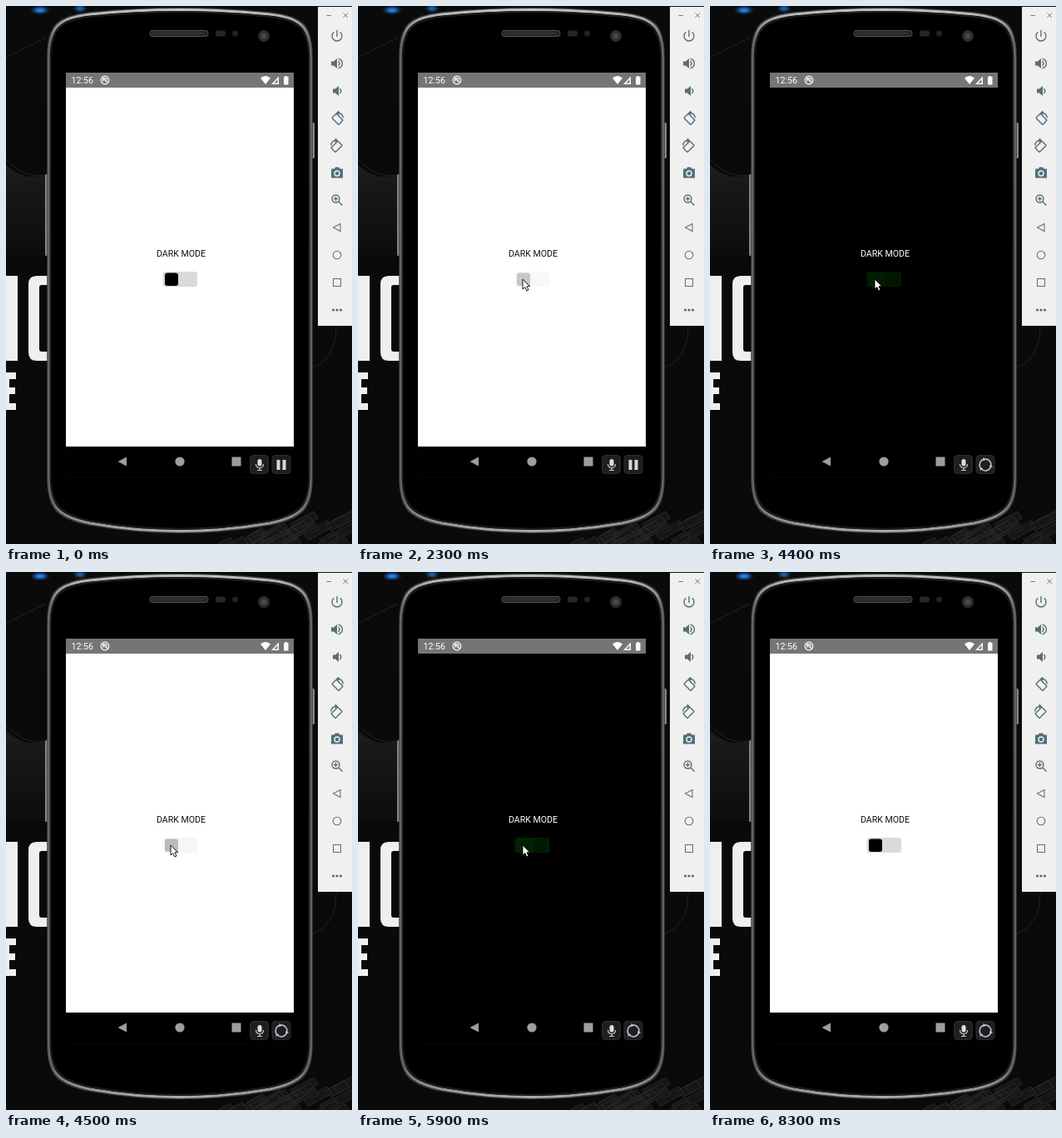
These frames come from a looping animation (416 by 646 pixels, 8600 ms). An HTML page:

```html
<!DOCTYPE html>
<html>
<head>
<meta charset="utf-8">
<style>
html, body { margin: 0; width: 100%; height: 100%; overflow: hidden; background: #0a0a0b }
svg { display: block; width: 416px; height: 646px }
text { font-family: Roboto, sans-serif }
.line { fill: none; stroke: #546e7a; stroke-width: 1.4 }
.thin { fill: none; stroke: #5f7680; stroke-width: 1.1 }
.solid { fill: #546e7a; stroke: none }
</style>
</head>
<body>
<svg viewBox="0 0 416 646">
  <defs>
    <linearGradient id="cloth" x2="0" y2="1">
      <stop stop-color="#1c1c1f"/><stop offset="1" stop-color="#0c0c0d"/>
    </linearGradient>
    <linearGradient id="rim" x2="0" y2="1">
      <stop stop-color="#c4c4c4"/><stop offset=".06" stop-color="#6a6a6a"/><stop offset=".5" stop-color="#666"/>
      <stop offset=".94" stop-color="#666"/><stop offset="1" stop-color="#aaa"/>
    </linearGradient>
    <radialGradient id="glow"><stop stop-color="#2f97f2"/><stop offset=".4" stop-color="#1b5fae"/><stop offset="1" stop-color="#0a2038" stop-opacity="0"/></radialGradient>
    <path id="body" d="M50 60C50 24 61 12 100 8Q209-3 318 8C357 12 368 24 368 60V568C368 603 357 615 318 623Q209 642 100 623C61 615 50 603 50 568Z"/>
  </defs>

  <!-- wallpaper -->
  <rect width="416" height="646" fill="#0a0a0b"/>
  <path d="M0 190Q24 214 52 200V300H0Z" fill="url(#cloth)"/>
  <path d="M0 184Q22 208 50 203M0 62L48 38M368 434Q397 424 397 384" fill="none" stroke="#232326"/>
  <ellipse cx="41" cy="5" rx="13" ry="6" fill="url(#glow)"/>
  <ellipse cx="89" cy="3" rx="10" ry="6" fill="url(#glow)" opacity=".7"/>
  <path id="blocks" fill="#161618" stroke="#29292c"/>
  <g fill="#efefef">
    <path d="M0 324H14V426H0ZM60 324H37Q27 324 27 334V416Q27 426 37 426H60V415H43Q40 415 40 412V338Q40 335 43 335H60Z"/>
    <path d="M0 440H12V448H4V458H11V466H4V477H12V485H0Z"/>
  </g>

  <!-- phone -->
  <g fill="#858585"><rect x="47" y="202" width="5" height="98" rx="1.5"/><rect x="366" y="140" width="5" height="43" rx="1.5"/></g>
  <use href="#body" stroke="#3c3c3c" stroke-width="1.5"/>
  <use href="#body" stroke="url(#rim)" stroke-width="3" transform="translate(2.1 2) scale(.99 .9937)"/>
  <use href="#body" fill="none" stroke="#1e1e1e" stroke-width="2" transform="translate(4.6 4.8) scale(.978 .985)"/>
  <rect x="173" y="29.5" width="70" height="7" rx="3" fill="#242424" stroke="#505050"/>
  <path d="M177 33H239" stroke="#3c3c3c" stroke-width="3" stroke-dasharray="1 1"/>
  <rect x="252" y="29.5" width="12" height="7" rx="3" fill="#262626"/>
  <circle cx="275.5" cy="33" r="3.5" fill="#222"/>
  <circle cx="310" cy="36" r="7" fill="#2d2d30"/><circle cx="310" cy="36" r="3.5" fill="#47474c"/>

  <!-- screen -->
  <path d="M72.5 98V566H345.5" fill="none" stroke="#080808"/>
  <rect id="page" x="72" y="98" width="274" height="431"/>
  <rect x="72" y="80" width="274" height="18" fill="#757575"/>
  <g fill="#fff">
    <text x="78.5" y="93.3" font-size="10.7">12:56</text>
    <path d="M306 86.500Q312 81.500 318 86.500L312 94ZM328 84.500V94H319ZM334 85H335.500V84H338V85H339.500V94.500H334Z"/>
    <path d="M326.500 88V92.500H322.500Z" fill="#757575"/>
    <g fill="none" stroke="#fff" stroke-width="1.2">
      <circle cx="119" cy="89" r="4.8"/><path d="M116 86L122 92M117 90.500A2.500 2.500 0 1 1 121.500 89.500"/>
    </g>
  </g>
  <text id="label" x="210.5" y="301" font-size="10.6" text-anchor="middle">DARK MODE</text>
  <rect id="track" x="188.5" y="319" width="41.5" height="18" rx="3"/>
  <rect id="thumb" y="320.5" width="16" height="15.5" rx="3"/>
  <g fill="#9e9e9e"><path d="M134.500 547L145 541.500V552.500ZM271.500 541.500H282.500V552.500H271.500Z"/><circle cx="209" cy="547" r="5.6"/></g>

  <!-- recorder buttons -->
  <g fill="#1e1f22" stroke="#2c2d31"><rect x="293.5" y="539.5" width="22" height="22" rx="4"/><rect x="320" y="539.5" width="22" height="22" rx="4"/></g>
  <rect x="302.5" y="544" width="5" height="8.5" rx="2.5" fill="#ddd"/>
  <path d="M300.500 550Q300.500 554.500 305 554.500T309.500 550M305 554V557.500M302 557.500H308" fill="none" stroke="#ccc" stroke-width="1.2"/>
  <path id="pause" d="M325.500 545H329.500V557H325.500ZM332.500 545H336.500V557H332.500Z" fill="#d8d8d8"/>
  <g id="sync" transform="translate(331 551)">
    <g id="arc"><path d="M-6 3.500A7 7 0 0 1-1.500-6.800" fill="none" stroke="#c4c4c4" stroke-width="1.5"/><path d="M-2.500-9L1-6.700L-2.500-4.500Z" fill="#c4c4c4"/></g>
    <use href="#arc" transform="rotate(120)"/><use href="#arc" transform="rotate(240)"/>
  </g>

  <!-- emulator toolbar -->
  <rect x="375" y="1" width="41" height="383" fill="#f0f0f0"/>
  <path d="M385.500 11.500H391M405.500 8.500L411 14M411 8.500L405.500 14" stroke="#777"/>
  <g transform="translate(398 36)" class="line"><path d="M0-7V1M-3.600-4.800A6 6 0 1 0 3.600-4.800"/></g>
  <g transform="translate(398 69)"><path class="solid" d="M-7-2.500H-4L0-6V6L-4 2.500H-7Z"/><path class="line" d="M1.500-3Q4.500 0 1.500 3M1.500-5.800C8-4 8 4 1.500 5.800"/></g>
  <g transform="translate(398 102)"><path class="solid" d="M-5-2.500H-2L2-6V6L-2 2.500H-5Z"/><path class="line" d="M3.300-3Q6.300 0 3.300 3"/></g>
  <g id="turn" transform="translate(398 135)" class="line">
    <rect x="-3.7" y="-5.7" width="7.4" height="11.4" rx=".8" transform="translate(.5 .8) rotate(-45)"/>
    <path d="M7.200-.5Q7-6 1.500-6.800"/><path class="solid" d="M2.500-9.500V-4L-1.500-6.800Z"/>
  </g>
  <use href="#turn" transform="translate(796 33) scale(-1 1)"/>
  <g transform="translate(398 200)"><path class="solid" d="M-7-4.500H-3.500L-2-6.500H2L3.500-4.500H7V6.500H-7Z"/><circle cy="1" r="3" fill="#546e7a" stroke="#f0f0f0" stroke-width="1.4"/></g>
  <g transform="translate(398 233)" class="line"><circle cx="-1.5" cy="-1.5" r="4.5"/><path d="M2 2L6.500 6.500M-4-1.500H1M-1.500-4V1"/></g>
  <g class="thin"><path d="M393.500 266L402 261.500V270.500Z"/><circle cx="398" cy="299" r="4.8"/><rect x="393.5" y="327.5" width="9" height="9"/></g>
  <path d="M393.500 365H403" stroke="#546e7a" stroke-width="3.2" stroke-linecap="round" stroke-dasharray="0 4.5"/>

  <path id="cursor" d="M0 0V12L2.800 9.500L4.800 14L7 13L5 8.700H8.700Z" fill="#fff" stroke="#000" stroke-width=".9"/>
</svg>
<script>
const LOOP = 8600, STEP = 100;
const taps = [2300, 4400, 5800, 7400];
const moves = [
  { from: 100, to: 400, x: 20, y: 645 },
  { from: 400, to: 900, x: 1, y: 424 },
  { from: 900, to: 1300, x: 198, y: 328 },
  { from: 6200, to: 6500, x: 234, y: 406 },
  { from: 6600, to: 7100, x: 212.5, y: 332.5 },
  { from: 7800, to: 8300, x: 115, y: 670 }
];

const $ = id => document.getElementById(id);
const set = (id, name, value) => $(id).setAttribute(name, value);
const show = (id, on) => set(id, 'visibility', on ? 'visible' : 'hidden');
const within = (t, a, b) => t >= a && t < b;
const smooth = (t, a, b) => {
  const f = Math.min(1, Math.max(0, (t - a) / (b - a)));
  return f * f * (3 - 2 * f);
};

function pointerAt(t) {
  let x = 84, y = 602;
  for (const m of moves) {
    const f = smooth(t, m.from, m.to);
    x += (m.x - x) * f;
    y += (m.y - y) * f;
  }
  return [x, y];
}

// A tap dims the switch, flips the theme one step later, then fades back
function switchOpacity(t) {
  const tap = taps.findLast(start => t >= start);
  return tap === undefined ? 1 : .2 + .8 * smooth(t - tap, 50, 400);
}

function draw(now) {
  const t = Math.floor(now % LOOP / STEP) * STEP;
  const dark = taps.filter(tap => t >= tap + STEP).length % 2 === 1;
  const opacity = switchOpacity(t);
  const stopped = t >= taps[0] + STEP;
  set('page', 'fill', dark ? '#000' : '#fff');
  set('label', 'fill', dark ? '#fff' : '#111');
  set('track', 'fill', dark ? '#078d07' : '#dadada');
  set('track', 'opacity', opacity);
  set('thumb', 'opacity', opacity);
  set('thumb', 'x', dark ? 211 : 191);
  show('pause', !stopped);
  show('sync', stopped);
  show('cursor', within(t, 100, 400) || within(t, 900, 8300));
  set('cursor', 'transform', `translate(${pointerAt(t)})`);
  requestAnimationFrame(draw);
}

let seed = 7;
const random = () => (seed = seed * 16807 % 2147483647) / 2147483647;
let blocks = '';
for (let i = 0; i < 26; i++) {
  const x = 255 + random() * 150, y = 650 - random() * (x - 240) * .3, w = 8 + random() * 22;
  blocks += `M${x} ${y}l${w} ${-w * .55}l6 8l${-w} ${w * .55}Z`;
}
set('blocks', 'd', blocks);
requestAnimationFrame(draw);
</script>
</body>
</html>
```
